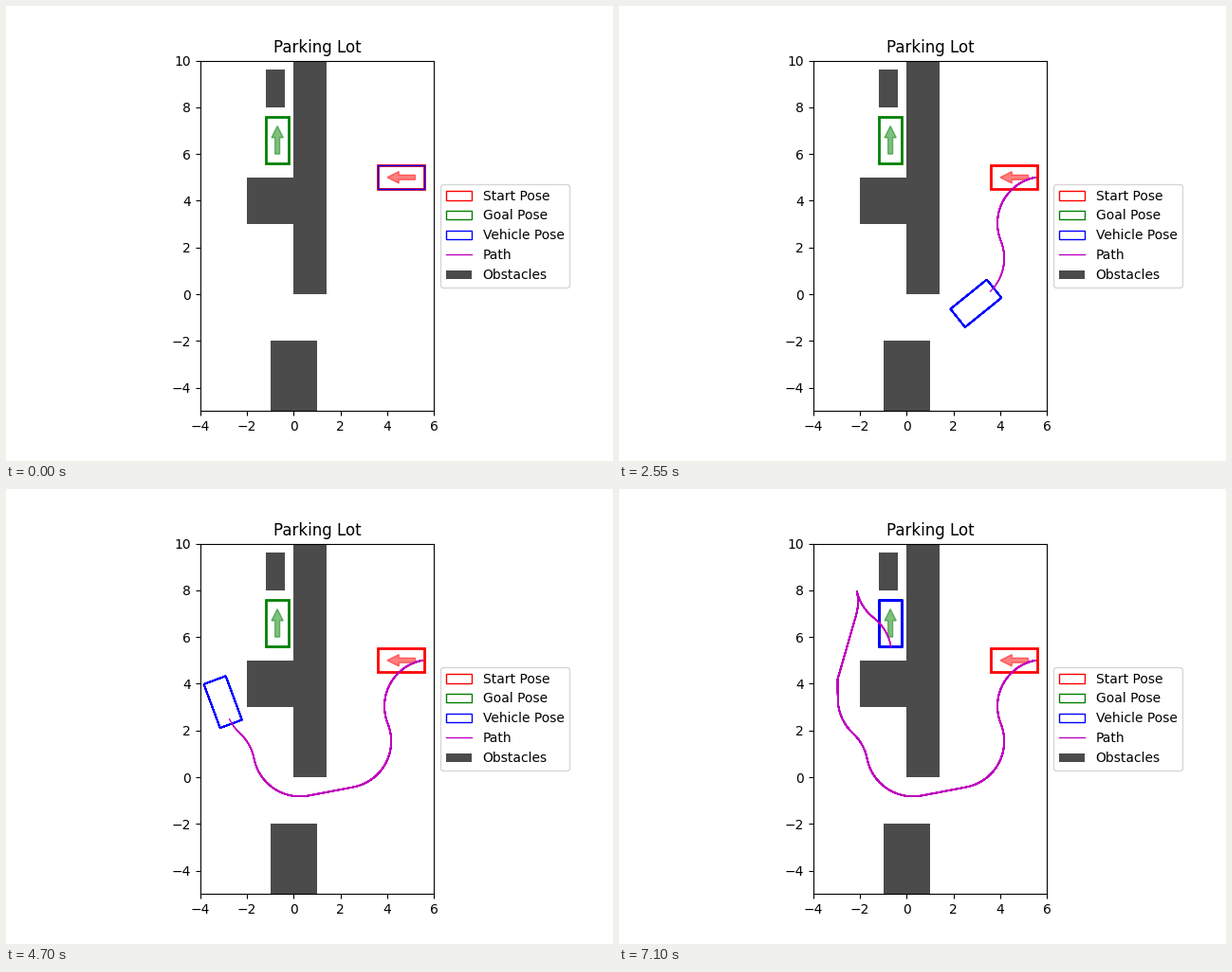
A matplotlib script that plays this animation: 640 px wide and 480 px high, repeating every 9100 ms.

```python
import numpy as np
import matplotlib.pyplot as plt
from matplotlib.animation import FuncAnimation
from matplotlib.lines import Line2D
from matplotlib.patches import FancyArrow, Patch, Polygon, Rectangle

RADIUS = 2.0
REAR, FRONT, HALF_WIDTH = 0.4, 1.6, 0.5
START = (5.2, 5.0, np.pi)
GOAL = (-0.7, 6.0, np.pi / 2)
WAIT, STEPS, FRAMES = 21, 120, 182
LAYERS = 30  # repeated strokes harden the antialiased edges
GREY = "#4b4b4b"

# (heading at entry or None, turn in degrees, straight length, gear)
SEGMENTS = [
    (191, 101, 0, 1),
    (None, -101.2, 0, 1),
    (None, 0, 1.94, 1),
    (None, -89.8, 0, 1),
    (None, 36.3, 0, 1),
    (None, -46.3, 0, 1),
    (None, 0, 0.86, 1),
    (73.9, 0, 2.89, 1),
    (None, 29, 0, 1),
    (None, 39.1, 0, -1),
    (None, -42, 0, -1),
]


def drive():
    """Trace the segments; return distance, x, y and heading samples."""
    x, y, heading, dist = 5.5, 5.0, 0.0, 0.0
    rows = []
    for entry, turn, straight, gear in SEGMENTS:
        if entry is not None:
            heading = np.radians(entry)
        turn = np.radians(turn)
        length = straight or RADIUS * abs(turn)
        n = 200
        ds = length / n
        for _ in range(n):
            rows.append((dist, x, y, heading))
            mid = heading + turn / n / 2
            x += gear * ds * np.cos(mid)
            y += gear * ds * np.sin(mid)
            heading += turn / n
            dist += ds
    rows.append((dist, x, y, heading))
    return np.array(rows).T


def sample_poses():
    dist, *track = drive()
    steps = [0, 20, 42, 56, 73, 75, 82, 94, 104, 113, 119]
    marks = [0, 4.015, 8.55, 11.17, 14.34, 14.74, 15.88, 17.6, 19.78, 21.55, dist[-1]]
    at = np.interp(np.arange(STEPS), steps, marks)
    return np.column_stack([np.interp(at, dist, values) for values in track])


def outline(pose):
    x, y, heading = pose
    c, s = np.cos(heading), np.sin(heading)
    box = [(-REAR, -HALF_WIDTH), (FRONT, -HALF_WIDTH),
           (FRONT, HALF_WIDTH), (-REAR, HALF_WIDTH)]
    return np.array([(x + u * c - v * s, y + u * s + v * c) for u, v in box])


def add_marker(pose, color):
    x, y, heading = pose
    ax.add_patch(Polygon(outline(pose), fill=False, ec=color, lw=2))
    ax.add_patch(FancyArrow(x, y, 1.2 * np.cos(heading), 1.2 * np.sin(heading),
                            width=0.2, head_width=0.5, head_length=0.5,
                            length_includes_head=True, color=color, alpha=0.5))


poses = sample_poses()

fig, ax = plt.subplots(figsize=(6.4, 4.8), dpi=100)
ax.set_aspect("equal")
ax.set_xlim(-4, 6)
ax.set_ylim(-5, 10)
ax.set_title("Parking Lot")

for x, y, w, h in [(0, 0, 1.4, 10), (-2, 3, 2, 2), (-1.2, 8, 0.8, 1.6), (-1, -5, 2, 3)]:
    ax.add_patch(Rectangle((x, y), w, h, fc=GREY, lw=0))
add_marker(START, "r")
add_marker(GOAL, "g")

cars = [ax.add_patch(Polygon(outline(START), fill=False, ec="b", lw=1))
        for _ in range(LAYERS)]
trails = [ax.plot([], [], "m-", lw=1)[0] for _ in range(LAYERS)]

ax.legend(
    handles=[
        Patch(fill=False, ec="r", lw=1, label="Start Pose"),
        Patch(fill=False, ec="g", lw=1, label="Goal Pose"),
        Patch(fill=False, ec="b", lw=1, label="Vehicle Pose"),
        Line2D([], [], color="m", lw=1, label="Path"),
        Patch(fc=GREY, lw=0, label="Obstacles"),
    ],
    loc="center left", bbox_to_anchor=(1, 0.5),
)


def update(frame):
    frame = min(frame, WAIT + STEPS + 1)
    step = frame - WAIT
    if step < 0:
        pose = START
    elif step < STEPS:
        pose = poses[step]
    else:
        pose = GOAL
    corners = outline(pose)
    for i, car in enumerate(cars):
        car.set_xy(corners)
        car.set_visible(i <= frame)
    for i, trail in enumerate(trails):
        done = poses[:max(step - i, 0)]
        trail.set_data(done[:, 0], done[:, 1])
    return cars + trails


anim = FuncAnimation(fig, update, frames=FRAMES, interval=50,
                     repeat=True, repeat_delay=0, blit=False)
plt.show()
```
